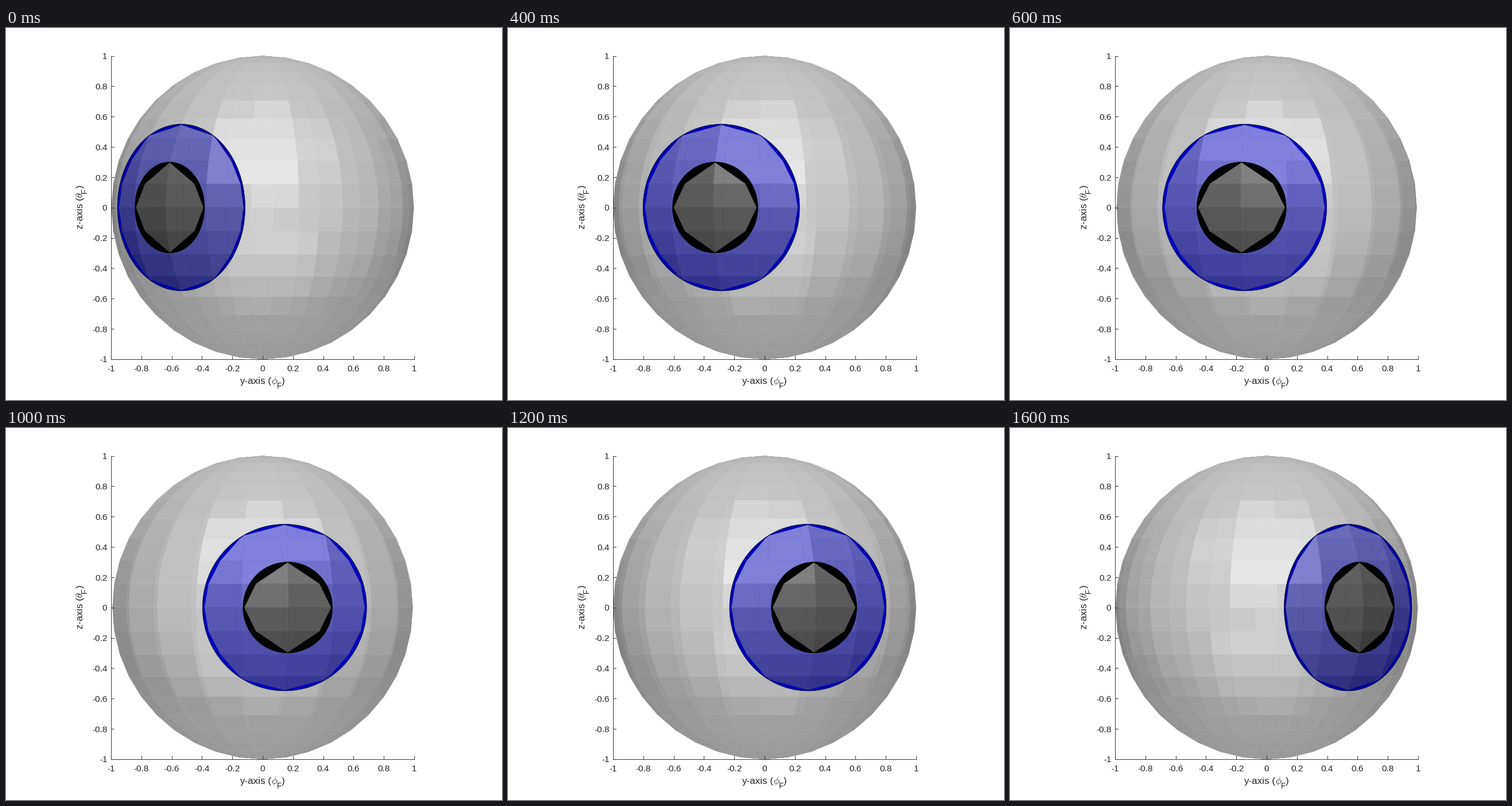
Write a matplotlib script that moves like this. It is 864 by 648 pixels and loops after 1.8 s.

```python
import numpy as np
import matplotlib.pyplot as plt
from matplotlib.animation import FuncAnimation
from matplotlib.collections import PolyCollection
from matplotlib.patches import Polygon
from matplotlib.path import Path

plt.rcParams["font.family"] = "Liberation Sans"
plt.rcParams["mathtext.fontset"] = "cm"

W, H = 864, 648
CX, CY, R = 447, 312.7, 264
INK = (0.15, 0.15, 0.15)
LIGHT = np.array([1, 0, 1]) / np.sqrt(2)
LATS = np.radians(np.arange(-90, 91, 9))
STEP = 18
ALPHA = 0.5
WHITE, BLUE, BLACK = np.ones(3), np.array([0, 0, 1.0]), np.zeros(3)
IRIS_R, PUPIL_R = 0.55, 0.30

fig = plt.figure(figsize=(W / 72, H / 72), dpi=72, facecolor="white")
ax = fig.add_axes([0, 0, 1, 1])
ax.set_xlim(0, W)
ax.set_ylim(H, 0)
ax.axis("off")


def to_px(y, z):
    return np.column_stack([CX + R * np.asarray(y), CY - R * np.asarray(z)])


def shade(n, color):
    """Ambient, diffuse and specular light, seen along +x."""
    if n[0] < 0:
        n = -n
    diff = max(0.0, n @ LIGHT)
    mirror = max(0.0, 2 * diff * n[0] - LIGHT[0]) if diff > 0 else 0.0
    return np.clip(color * (0.3 + 0.6 * diff) + 0.9 * mirror ** 10, 0, 1)


def facet_color(band, az, turn):
    """Light on the flat facet of a band that holds azimuth az (degrees)."""
    mid = np.radians((np.floor((az - turn) / STEP) + 0.5) * STEP + turn)
    a, b = LATS[band], LATS[band + 1]
    rad = np.sin(b) - np.sin(a)
    up = (np.cos(a) - np.cos(b)) * np.cos(np.radians(STEP / 2))
    n = np.array([rad * np.cos(mid), rad * np.sin(mid), up])
    return shade(n / np.linalg.norm(n), WHITE)


def sphere_cells(turn):
    """Cells bounded by front and back facet edges, with both colours."""
    edges = np.sin(np.radians(turn + STEP * np.arange(20)))
    edges = np.unique(np.round(edges, 6))
    verts, front, back = [], [], []
    for band in range(len(LATS) - 1):
        a, b = LATS[band], LATS[band + 1]
        ca, cb, sa, sb = np.cos(a), np.cos(b), np.sin(a), np.sin(b)
        for u, v in zip(edges[:-1], edges[1:]):
            az = np.degrees(np.arcsin((u + v) / 2))
            verts.append(to_px([u * ca, v * ca, v * cb, u * cb],
                               [sa, sa, sb, sb]))
            front.append(facet_color(band, az, turn))
            back.append(facet_color(band, 180 - az, turn))
    return verts, np.array(front), np.array(back)


def section(depth):
    """Outline of the faceted sphere cut by the plane x = depth."""
    az = np.radians(np.arange(-90, 91, STEP))
    grid = np.array([[(np.cos(l) * np.cos(a), np.cos(l) * np.sin(a), np.sin(l))
                      for a in az] for l in LATS])
    pts = []
    for g in (grid, grid.transpose(1, 0, 2)):
        for p, q in zip(g[:-1].reshape(-1, 3), g[1:].reshape(-1, 3)):
            if (p[0] - depth) * (q[0] - depth) < 0:
                t = (depth - p[0]) / (q[0] - p[0])
                pts.append((p + t * (q - p))[1:])
    return np.array(sorted(pts, key=lambda p: np.arctan2(p[1], p[0])))


def cells(zorder):
    c = PolyCollection([], linewidths=0.4, zorder=zorder)
    ax.add_collection(c, autolim=False)
    return c


def paint(coll, verts, colors):
    coll.set_verts(verts)
    coll.set_facecolor(colors)
    coll.set_edgecolor(colors)


class Disc:
    """Flat disc inside the sphere, covered by its clear facets."""

    def __init__(self, radius, color, zorder):
        t = np.linspace(0, 2 * np.pi, 240)
        self.color = color
        self.depth = np.sqrt(1 - radius ** 2)
        self.rim = radius * np.column_stack([np.cos(t), np.sin(t)])
        self.cut = section(self.depth)
        self.patch = ax.add_patch(Polygon([(0, 0), (1, 0), (0, 1)], ec="black",
                                          lw=0.6, zorder=zorder))
        self.cover = cells(zorder + 1)

    def turn(self, angle, verts, front):
        c, s = np.cos(angle), np.sin(angle)

        def project(p):
            return to_px(p[:, 0] * c + self.depth * s, p[:, 1])

        lit = shade(np.array([c, s, 0]), self.color)
        self.patch.set_xy(project(self.rim))
        self.patch.set_facecolor(lit)
        paint(self.cover, verts, (1 - ALPHA) * lit + ALPHA * front)
        cut = project(self.cut)
        self.cover.set_clip_path(Path(np.vstack([cut, cut[:1]])), ax.transData)


def draw_axes():
    left, right, top, bottom = CX - R, CX + R, CY - R, CY + R
    style = dict(color=INK, lw=0.9, zorder=10)
    ax.plot([left, left], [top, bottom], **style)
    ax.plot([left, right], [bottom, bottom], **style)
    for k in range(-5, 6):
        v = k / 5
        x, y = CX + R * v, CY - R * v
        ax.plot([x, x], [bottom, bottom - 5.3], **style)
        ax.plot([left, left + 5.3], [y, y], **style)
        text = f"{v:g}"
        ax.text(x, 598.5, text, size=15.4, color=INK, ha="center", va="baseline")
        ax.text(176.5, y + 5.8, text, size=15.4, color=INK, ha="right",
                va="baseline")


def draw_label(x, y, name, greek, width, upright=False):
    """Axis title set piece by piece along its baseline."""
    end = 54.6 + width
    pieces = [(0, 0, name + "-axis (", 17), (54.6, 0, greek, 17),
              (end + 0.3, 7.5, "F", 13.6), (end + 8.7, 0, ")", 17)]
    for along, drop, text, size in pieces:
        px, py = (x + drop, y - along) if upright else (x + along, y + drop)
        ax.text(px, py, text, size=size, color=INK, ha="left", va="baseline",
                rotation=90 if upright else 0, rotation_mode="anchor")


draw_axes()
draw_label(407, 620.3, "y", r"$\phi$", 10)
draw_label(133.8, 350.5, "z", r"$\theta$", 8, upright=True)

ball = cells(2)
iris = Disc(IRIS_R, BLUE, 3)
pupil = Disc(PUPIL_R, BLACK, 5)


def update(i):
    turn = -40 + 10 * i
    verts, front, back = sphere_cells(turn)
    behind = (1 - ALPHA) * WHITE + ALPHA * back
    paint(ball, verts, (1 - ALPHA) * behind + ALPHA * front)
    for disc in (iris, pupil):
        disc.turn(np.radians(turn), verts, front)
    return []


anim = FuncAnimation(fig, update, frames=9, interval=200, repeat=True,
                     repeat_delay=0, blit=False)
plt.show()
```
